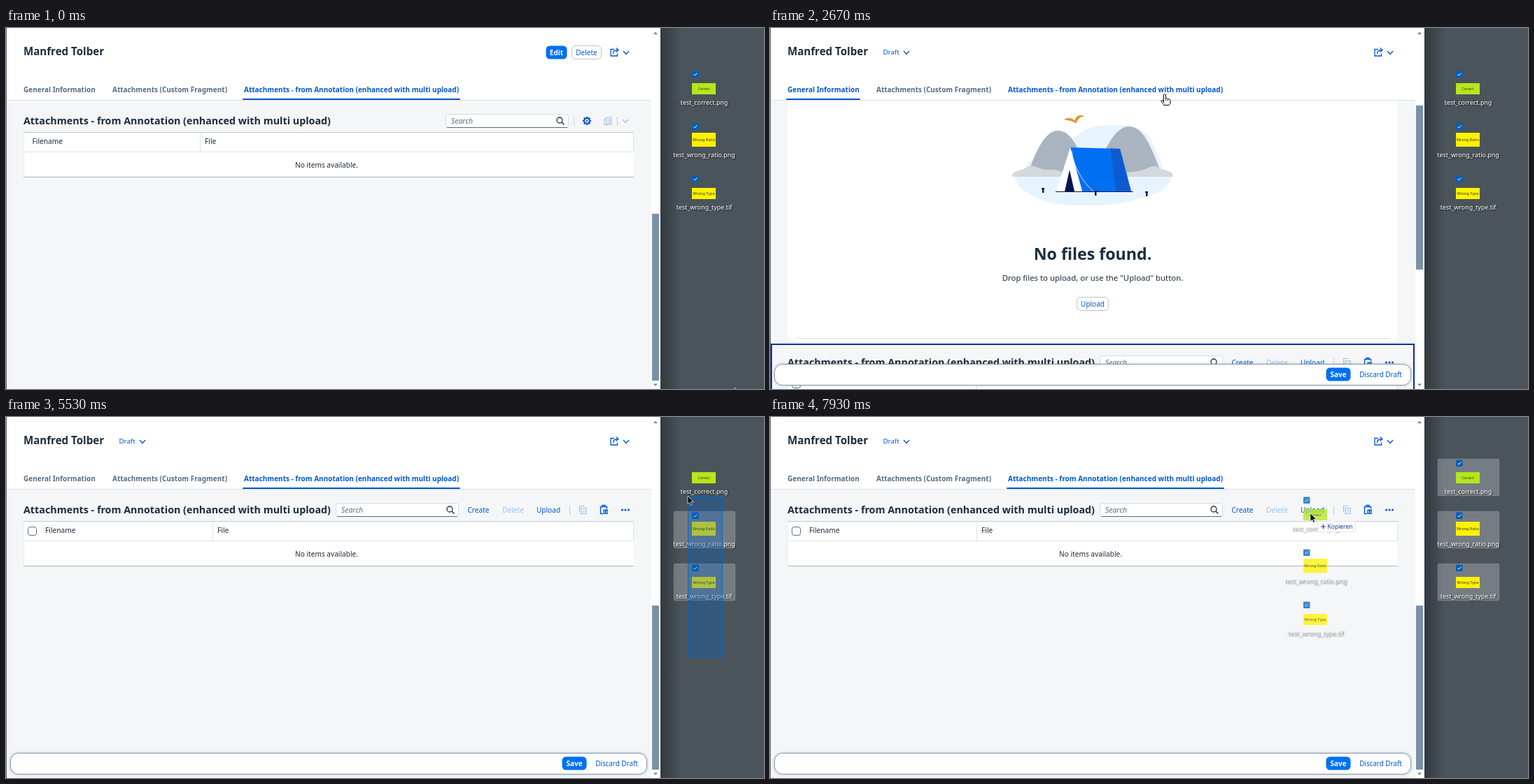
Write an HTML page with a canvas that moves like this. It is 1083x517 px and loops after 8000 ms.

```html
<!DOCTYPE html>
<html lang="en">
<head>
<meta charset="utf-8">
<title>Upload demo</title>
<style>
html, body { margin: 0; width: 100%; height: 100%; overflow: hidden; background: #4b545b; }
canvas { display: block; }
</style>
</head>
<body>
<canvas id="stage" width="1083" height="517"></canvas>
<script>
const ctx = document.getElementById('stage').getContext('2d');
const W = 1083, H = 517, LOOP = 8000, STEP = 1000 / 15;
const FONT = '"Noto Sans", "Open Sans", sans-serif';
const BLUE = '#0057d2', INK = '#1d2d3e', GREY = '#556b82', FADED = '#9cc1ec', ACCENT = '#0070f2', NAVY = '#0a1550';
const NAME = 'Manfred Tolber';
const TITLE = 'Attachments - from Annotation (enhanced with multi upload)';
const TABS = [['General Information', 25, 127], ['Attachments (Custom Fragment)', 152, 315], [TITLE, 340, 647]];
const FILES = [
  { name: 'test_correct.png', tag: 'Correct', y: 60, top: 79, h: 16, fill: '#b5e61d' },
  { name: 'test_wrong_ratio.png', tag: 'Wrong Ratio', y: 135, top: 150, h: 20, fill: '#fff200' },
  { name: 'test_wrong_type.tif', tag: 'Wrong Type', y: 210, top: 229, h: 16, fill: '#fff200' }
];
const EDIT_AT = 1400, TOP_AT = 1600, CLICK_AT = 2330, SCROLL_AT = 2413, BLUR_AT = 3860;
const BAND_AT = 5130, BAND_END = 5850, DRAG_AT = 6440, MAX_SCROLL = 558;

// pointer path: time, x, y
const PATH = [
  [0, 1041, 515], [30, 1041, 515], [133, 800, 455], [200, 560, 384], [267, 414, 424],
  [420, 414, 424], [700, 540, 290], [950, 735, 95], [1133, 794, 38], [1300, 794, 38],
  [1533, 613, 98], [1680, 564, 98], [3290, 564, 98], [3600, 753, 291], [3850, 753, 291],
  [4100, 795, 170], [4333, 805, 136], [4500, 790, 165], [4667, 753, 210], [4900, 900, 290],
  [5100, 1023, 343], [5180, 1023, 343], [5533, 974, 113], [5700, 974, 82], [5880, 976, 80],
  [6100, 993, 88], [6430, 993, 88], [6800, 930, 100], [7267, 797, 129], [7533, 778, 135],
  [7667, 772, 138], [LOOP, 772, 138]
];

const clamp = v => Math.max(0, Math.min(1, v));

function pointer(t) {
  let i = 1;
  while (i < PATH.length - 1 && PATH[i][0] < t) i++;
  const [t0, x0, y0] = PATH[i - 1], [t1, x1, y1] = PATH[i];
  const u = clamp((t - t0) / (t1 - t0));
  return { x: Math.round(x0 + (x1 - x0) * u), y: Math.round(y0 + (y1 - y0) * u) };
}

function scrollLeft(t) {
  if (t < TOP_AT) return 0;
  const u = clamp((t - SCROLL_AT) / 600);
  return Math.round(MAX_SCROLL * (0.5 + Math.cos(Math.PI * u) / 2));
}

function text(s, x, y, size, color, style = '', align = 'left') {
  ctx.font = `${style} ${size}px ${FONT}`;
  ctx.fillStyle = color;
  ctx.textAlign = align;
  ctx.fillText(s, x, y + size * 0.36);
}

function rect(x, y, w, h, color) {
  ctx.fillStyle = color;
  ctx.fillRect(x, y, w, h);
}

function box(x, y, w, h, r, fill, stroke) {
  ctx.beginPath();
  ctx.roundRect(x, y, w, h, r);
  if (fill) { ctx.fillStyle = fill; ctx.fill(); }
  if (stroke) { ctx.strokeStyle = stroke; ctx.lineWidth = 1; ctx.stroke(); }
}

function ring(x, y, r, color, width) {
  ctx.beginPath();
  ctx.arc(x, y, r, 0, 7);
  ctx.strokeStyle = color;
  ctx.lineWidth = width;
  ctx.stroke();
}

function dot(x, y, r, color) {
  ctx.beginPath();
  ctx.arc(x, y, r, 0, 7);
  ctx.fillStyle = color;
  ctx.fill();
}

function line(pts, color, width = 1) {
  ctx.beginPath();
  pts.forEach(([x, y]) => ctx.lineTo(x, y));
  ctx.strokeStyle = color;
  ctx.lineWidth = width;
  ctx.stroke();
}

function poly(pts, fill) {
  ctx.beginPath();
  pts.forEach(([x, y]) => ctx.lineTo(x, y));
  ctx.closePath();
  ctx.fillStyle = fill;
  ctx.fill();
}

function shape(d, fill, stroke, width = 1) {
  const p = new Path2D(d);
  if (fill) { ctx.fillStyle = fill; ctx.fill(p); }
  if (stroke) { ctx.strokeStyle = stroke; ctx.lineWidth = width; ctx.stroke(p); }
}

function at(x, y, draw) {
  ctx.save();
  ctx.translate(x, y);
  draw();
  ctx.restore();
}

const chevron = (x, y, color = BLUE) => line([[x - 4, y - 2], [x, y + 2.5], [x + 4, y - 2]], color, 1.4);

function button(label, x, y, w, mode) {
  const solid = mode !== 'plain';
  box(x + 0.5, y + 0.5, w - 1, 19, 5.5, mode === 'hover' ? '#0064d9' : solid ? ACCENT : '#fff', solid ? null : '#bcc3ca');
  text(label, x + w / 2, y + 10, 10, solid ? '#fff' : BLUE, solid ? 'bold' : '500', 'center');
}

function search(x) {
  box(x + 0.5, 123.5, 175, 19, 3, '#fff', '#d5dadf');
  line([[x + 2, 142.5], [x + 174, 142.5]], GREY);
  text('Search', x + 8, 133, 10.4, GREY, 'italic');
  ring(x + 163, 132, 4, INK, 1.3);
  line([[x + 166, 135], [x + 169.5, 138.5]], INK, 1.5);
}

function viewTools() {
  search(628);
  rect(811, 127, 1, 13, '#d0d5da');
  at(830, 133, () => {
    for (let i = 0; i < 8; i++) {
      ctx.rotate(Math.PI / 4);
      rect(-1.3, -6, 2.6, 3, BLUE);
    }
    ring(0, 0, 3.6, BLUE, 1.6);
    dot(0, 0, 1.2, BLUE);
  });
  shape('M858 128h7v10h-7zM858 130h-3v8.5h6M860 131h4M860 133.5h4M860 136h4', null, FADED, 1.1);
  rect(873, 127, 1, 13, '#c5ccd3');
  chevron(885, 133, FADED);
}

function editTools() {
  search(471);
  text('Create', 675, 133, 10.1, BLUE, '500', 'center');
  text('Delete', 724.5, 133, 10.1, FADED, '500', 'center');
  text('Upload', 775, 133, 10.1, BLUE, '500', 'center');
  rect(805, 127, 1, 13, '#c5ccd3');
  shape('M822 130.5h7v8h-7zM819.5 136.5v-9h7M824 133.5h3M824 136h3', null, FADED, 1.2);
  shape('M853 138.5h-3.5v-10h9v3M852 128v-1.5h4v1.5', null, BLUE, 1.4);
  rect(853.5, 132.5, 6.5, 6.5, BLUE);
  rect(855, 134, 1, 4, '#fff');
  rect(858, 134, 1, 4, '#fff');
  for (const x of [880.5, 885, 889.5]) dot(x, 133, 1.6, BLUE);
}

function tableSection(edit, focused) {
  text(TITLE, 25, 132.5, 14.3, INK, 'bold');
  edit ? editTools() : viewTools();
  rect(25, 149, 872, 65, '#fff');
  rect(25, 149, 872, 1, '#c3cad1');
  rect(25, 177, 872, 1, '#e0e3e6');
  rect(edit ? 295 : 277, 150, 1, 27, '#e0e3e6');
  rect(25, 150, 1, 63, '#eceef0');
  rect(896, 150, 1, 27, '#e0e3e6');
  rect(25, 213, 872, 1, '#a8b3bd');
  if (edit) box(31.5, 157.5, 12, 12, 3, '#fff', GREY);
  text('Filename', edit ? 56 : 37.5, 162, 10.2, INK);
  text('File', edit ? 302 : 284, 162, 10.2, INK);
  text('No items available.', 458, 196, 10.1, INK, '', 'center');
  if (focused) {
    ctx.strokeStyle = '#0032a5';
    ctx.lineWidth = 2;
    ctx.strokeRect(2, 107, 918, 122);
  }
}

function camp() {
  shape('M364 212C362 186 388 180 412 172C440 158 440 139 490 139C520 138 540 146 546 164C552 178 562 190 562 212Z', '#e8f4fd');
  shape('M350 213H574C570 232 550 238 528 244C506 252 486 254 456 254C420 254 400 253 384 244C368 238 352 228 350 213Z', '#e8f4fd');
  shape('M367 213C378 180 392 147 411 147C433 147 443 178 454 213Z', '#a9b4be');
  shape('M461 213C478 175 492 141 513 141C536 141 548 180 561 213Z', '#a9b4be');
  shape('M346 213C346 203 357 206 366 200C376 193 386 204 398 203C412 202 420 207 428 213ZM496 213C502 206 514 207 526 205C538 203 544 195 554 199C564 206 576 203 576 213Z', '#d3d9de');
  shape('M421 131C428 128 433 130 436 134C436 127 441 124 448 126C442 127 440 130 437 136C431 132 427 132 421 131Z', '#e9901e', '#e9901e', 1);
  poly([[429, 171], [500, 173], [516, 234], [446, 234]], ACCENT);
  poly([[486, 172.5], [500, 173], [516, 234], [494, 234]], '#0c5fdb');
  for (let y = 176; y < 233; y += 3)
    for (let x = 488 + (y - 173) * 0.13; x < 499 + (y - 173) * 0.26; x += 3) rect(x, y, 1.2, 1.2, '#1a3fa0');
  poly([[429, 171], [409, 234], [446, 234]], '#fff');
  poly([[428, 203], [421, 234], [435, 234]], NAVY);
  shape('M431 176C434 200 448 222 462 234', null, '#cfe6ff', 1);
  line([[408, 234.5], [519, 234.5]], NAVY, 1.2);
  for (const [x, y] of [[390, 229], [465, 233], [538, 234]]) {
    rect(x - 2, y, 4, 2, NAVY);
    rect(x - 1, y, 2.5, 7, NAVY);
  }
}

function emptySection() {
  text(TABS[1][0], 25, 38, 14.3, INK, 'bold');
  box(25, 60, 872, 389, 8, '#fff');
  camp();
  text('No files found.', 461, 324, 23.2, INK, 'bold', 'center');
  text('Drop files to upload, or use the "Upload" button.', 461, 357.5, 11.4, INK, '', 'center');
  button('Upload', 438, 385, 46, 'plain');
  rect(38, 444, 847, 1, '#dfe3e6');
}

function formSection(t) {
  box(25, 118, 872, 104, 8, '#fff');
  text('Name:', 50, 139, 10.2, GREY);
  box(50.5, 151.5, 250, 20, 3, '#fff', t < CLICK_AT ? '#0032a5' : '#d5dadf');
  line([[52, 171.5], [299, 171.5]], GREY);
  text(NAME, 60, 161, 10.2, INK);
  if (t < TOP_AT + 530) rect(59, 155, 1, 13, '#000');
}

function header(edit, tab, hover, p, t) {
  rect(1, 0, 921, 103, '#fff');
  rect(1, 103, 921, 1, '#dcdfe2');
  text(NAME, 25, 34, 15.1, INK, 'bold');
  if (edit) {
    text('Draft', 161.5, 35, 9.7, BLUE, '500');
    chevron(195, 35);
  } else {
    const over = p.x > 771 && p.x < 802 && p.y > 25 && p.y < 45 || t > 1140;
    button('Edit', 771, 25, 31, over ? 'hover' : 'solid');
    button('Delete', 808, 25, 43, 'plain');
  }
  shape('M869 30.5h-5v9.5h9.5v-3.5M867.5 37c0-4 2-5.5 6.5-5.5M871.5 28.5l3.5 3l-3.5 3', null, BLUE, 1.3);
  chevron(886, 35);
  TABS.forEach(([label, x, end], i) => {
    text(label, x, 88, 10, i === tab || i === 2 && hover ? BLUE : GREY, 'bold');
    if (i === tab) box(x - 2, 101, end - x + 4, 2, 1, BLUE);
  });
}

function scrollbar(edit, left) {
  rect(922, -1, 13, 540, '#fff');
  const top = edit ? 270 - left / 2.176 : 266;
  rect(923, top, 10, edit ? 235 : 239, '#7b91a8');
  poly([[925, 9], [931, 9], [928, 5.5]], '#7c8791');
  poly([[925, 509.5], [931, 509.5], [928, 513]], '#7c8791');
}

function footer(t) {
  const u = clamp((t - 1430) / 190);
  if (!u) return;
  ctx.save();
  ctx.translate(0, Math.round(12 * (1 - u)));
  ctx.shadowColor = `rgba(34,53,72,${0.3 * u * u})`;
  ctx.shadowBlur = 4;
  box(6.5, 481.5, 909, 30, 11, '#fff');
  ctx.shadowColor = 'transparent';
  ctx.globalAlpha = u ** 1.5;
  box(6.5, 481.5, 909, 30, 11, null, '#8396a8');
  button('Save', 794, 486, 36, 'solid');
  if (u < 1) box(837.5, 486.5, 70, 19, 5, null, BLUE);
  text('Discard Draft', 872.5, 496, 9.85, BLUE, '500', 'center');
  ctx.restore();
}

function browser(t, p, hand) {
  const edit = t >= EDIT_AT, left = scrollLeft(t);
  const tab = left > 220 ? 0 : 2;
  const lift = edit && t < TOP_AT ? -14 : 0;
  ctx.save();
  ctx.beginPath();
  ctx.rect(0, 0, 935, H);
  ctx.clip();
  rect(0, 0, 935, H, '#f5f6f7');
  at(0, lift, () => {
    at(0, left, () => tableSection(edit, t >= CLICK_AT && t < BLUR_AT));
    if (left) {
      at(0, left - 346, emptySection);
      at(0, left - MAX_SCROLL, () => formSection(t));
    }
    header(edit, tab, hand, p, t);
    scrollbar(edit, left);
  });
  if (edit) footer(t);
  rect(0, 0, 1, H, '#5a6167');
  ctx.restore();
}

function desktop() {
  rect(935, 0, W - 935, H, '#4b545b');
  const g = ctx.createLinearGradient(935, 0, 965, 0);
  g.addColorStop(0, 'rgba(20,25,30,.45)');
  g.addColorStop(1, 'rgba(20,25,30,0)');
  rect(935, 0, 30, H, g);
}

function fileIcon(f, glow, checked) {
  if (glow) box(954, f.y, 88, 53, 2, `rgba(255,255,255,${glow})`, `rgba(255,255,255,${glow * 0.4})`);
  rect(980, f.top, 34, f.h, f.fill);
  text(f.tag, 997, f.top + f.h / 2, f.tag === 'Correct' ? 4.9 : 5.5, '#30340c', '', 'center');
  if (checked) {
    box(980, f.y + 1.5, 9.5, 9.5, 1, '#005fb8');
    line([[982.5, f.y + 6.5], [984, f.y + 8], [987.5, f.y + 4.5]], '#fff');
  }
  ctx.save();
  ctx.shadowColor = 'rgba(0,0,0,.85)';
  ctx.shadowBlur = 2;
  ctx.shadowOffsetX = ctx.shadowOffsetY = 1;
  text(f.name, 997.5, f.y + 46.5, 8.9, '#fff', '', 'center');
  ctx.restore();
}

function files(t, p) {
  const band = t >= BAND_AT && t < BAND_END;
  FILES.forEach((f, i) => {
    const on = !band || p.y < f.y + 52;
    const hover = i === 0 && t >= BAND_END && t < DRAG_AT;
    fileIcon(f, t >= BAND_AT && on ? (hover ? 0.14 : 0.24) : 0, on);
  });
  if (band) box(p.x + 0.5, p.y + 0.5, 1023 - p.x, 343 - p.y, 0, 'rgba(0,95,195,.32)', '#0b67bd');
}

function dragGhost(p) {
  ctx.save();
  ctx.globalAlpha = 0.75;
  ctx.translate(p.x - 990, p.y - 85);
  FILES.forEach(f => fileIcon(f, 0, true));
  ctx.restore();
  if (p.x > 930) return;
  at(p.x, p.y, () => {
    box(10.5, 11.5, 54, 15, 1, '#fff', '#e3e6ea');
    line([[15, 19], [22, 19]], '#123a86');
    line([[18.5, 15.5], [18.5, 22.5]], '#123a86');
    text('Kopieren', 24.5, 19, 8.5, '#123a86');
  });
}

function drawPointer(p, hand) {
  at(p.x, p.y, () => {
    ctx.lineJoin = 'round';
    if (hand) {
      shape('M-1.5 9V-2.5Q0-4.5 1.5-2.5V3Q3 1.5 4 3.5Q5.5 2.5 6 4.5Q8 4 8 6V9Q7.5 11 6 12.5H-1Q-3 9-5.5 6.5Q-4.5 4-1.5 7Z', '#fff', '#000', 1);
      line([[1.5, 3], [1.5, 6]], '#000', 0.8);
      line([[4, 4], [4, 6.5]], '#000', 0.8);
    } else {
      shape('M0 0V11.5L2.7 9L4.5 13.3L6.5 12.4L4.7 8.3H8.5Z', '#000', '#fff', 0.7);
    }
  });
}

function frame(now) {
  const t = Math.floor((now % LOOP + 4) / STEP) * STEP % LOOP, p = pointer(t);
  const hand = t > 1600 && p.y > 78 && p.y < 103 && p.x > 340 && p.x < 647;
  desktop();
  browser(t, p, hand);
  files(t, p);
  if (t >= DRAG_AT) dragGhost(p);
  drawPointer(p, hand);
  requestAnimationFrame(frame);
}
requestAnimationFrame(frame);
</script>
</body>
</html>
```
